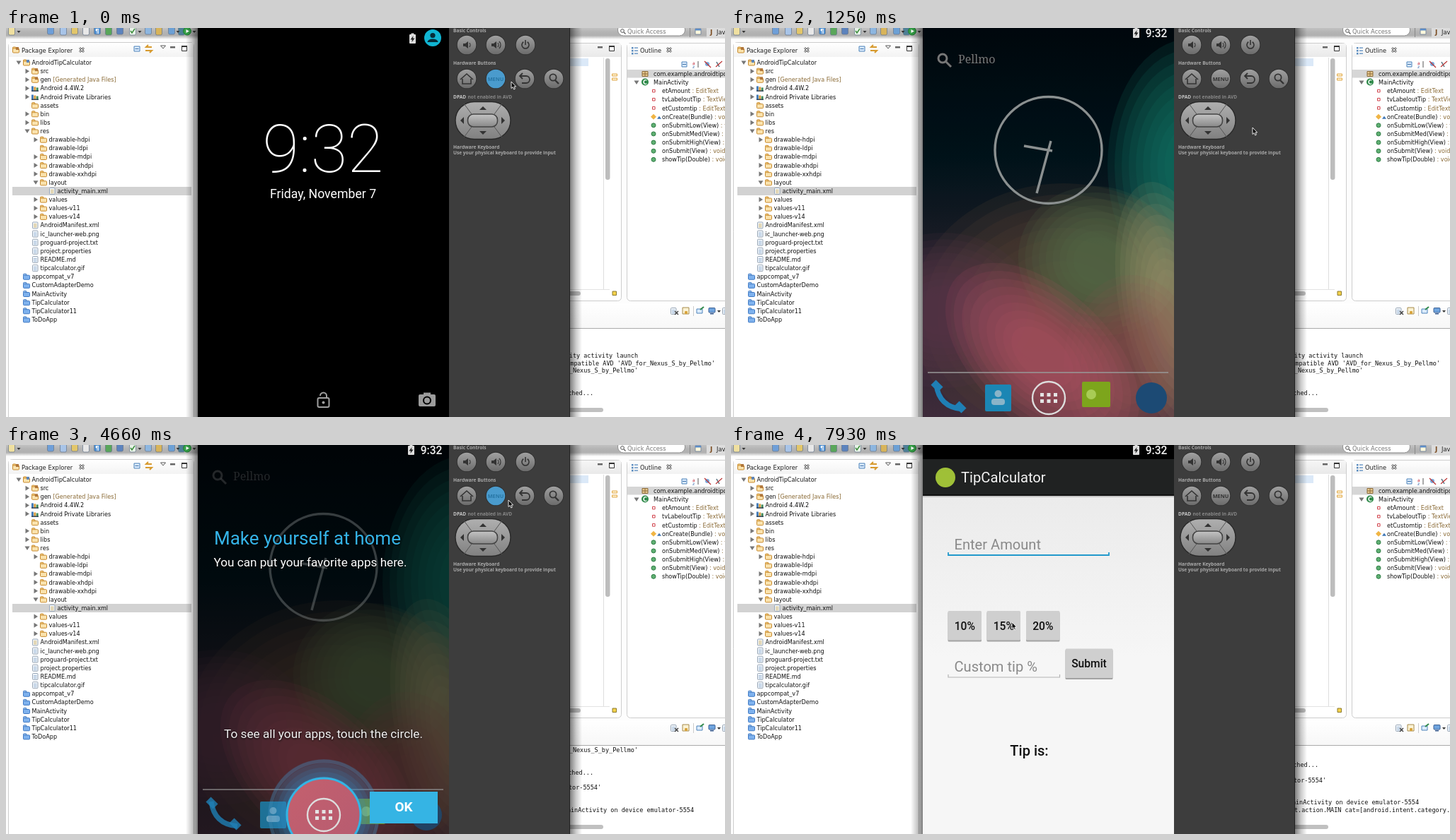
Recreate the animation shown at these times as an HTML page with a canvas. Size 1016x551 px, loop 8000 ms.

```html
<!DOCTYPE html>
<html lang="en">
<head>
<meta charset="utf-8">
<style>
html, body { margin: 0; width: 100%; height: 100%; overflow: hidden; background: #fff; }
canvas { display: block; }
</style>
</head>
<body>
<canvas id="stage" width="1016" height="551"></canvas>
<script>
const c = document.getElementById('stage').getContext('2d');
const LOOP = 8000, ROW = 12.13;
const UI = '"DejaVu Sans", sans-serif', MONO = '"DejaVu Sans Mono", monospace';
const ROBOTO = 'Roboto, sans-serif', PANEL = '"Open Sans", sans-serif';

// ---- drawing helpers ----
function rect(x, y, w, h, color) { c.fillStyle = color; c.fillRect(x, y, w, h); }
function paint(fill, stroke, width = 1) {
  if (fill) { c.fillStyle = fill; c.fill(); }
  if (stroke) { c.strokeStyle = stroke; c.lineWidth = width; c.stroke(); }
}
function round(x, y, w, h, r, fill, stroke, width) {
  c.beginPath(); c.roundRect(x, y, w, h, r); paint(fill, stroke, width);
}
function circle(x, y, r, fill, stroke, width) {
  c.beginPath(); c.arc(x, y, r, 0, 7); paint(fill, stroke, width);
}
function trace(points) {
  c.beginPath();
  for (let i = 0; i < points.length; i += 2) c.lineTo(points[i], points[i + 1]);
}
function poly(fill, ...points) { trace(points); c.closePath(); paint(fill); }
function line(color, width, ...points) { trace(points); paint(null, color, width); }
function text(s, x, y, size, color, font = UI, weight = 400, align = 'left') {
  c.font = `${weight} ${size}px ${font}`;
  c.fillStyle = color; c.textAlign = align;
  c.fillText(s, x, y);
}
function fade(x0, y0, x1, y1, ...colors) {
  const g = c.createLinearGradient(x0, y0, x1, y1);
  colors.forEach((color, i) => g.addColorStop(i / (colors.length - 1), color));
  return g;
}
// nested translucent ellipses that build up a stepped glow
function bands(x, y, rx, ry, angle, rgb, alpha) {
  for (let k = 1; k > .25; k -= .085) {
    c.beginPath(); c.ellipse(x, y, rx * k, ry * k, angle, 0, 7);
    paint(`rgba(${rgb},${alpha * .2})`);
  }
}
function clip(x, y, w, h, draw) {
  c.save(); c.beginPath(); c.rect(x, y, w, h); c.clip(); draw(); c.restore();
}
const at = (keys, t) => keys.findLast(k => k[0] <= t);

// ---- IDE ----
// level, arrow (- none, > closed, v open), icon, label
const tree = `0 v p AndroidTipCalculator
1 > s src
1 > s gen|[Generated Java Files]
1 > l Android 4.4W.2
1 > l Android Private Libraries
1 - o assets
1 > o bin
1 > o libs
1 v o res
2 > o drawable-hdpi
2 - o drawable-ldpi
2 > o drawable-mdpi
2 > o drawable-xhdpi
2 > o drawable-xxhdpi
2 v o layout
3 - x activity_main.xml
2 > o values
2 > o values-v11
2 > o values-v14
1 - x AndroidManifest.xml
1 - f ic_launcher-web.png
1 - f proguard-project.txt
1 - f project.properties
1 - f README.md
1 - f tipcalculator.gif
0 - b appcompat_v7
0 - b CustomAdapterDemo
0 - b MainActivity
0 - b TipCalculator
0 - b TipCalculator11
0 - b ToDoApp`.split('\n').map(r => [+r[0], r[2], r[4], r.slice(6)]);

const members = ['f etAmount : EditText', 'f tvLabeloutTip : TextView', 'f etCustomtip : EditText',
  'o onCreate(Bundle) : void', 'm onSubmitLow(View) : void', 'm onSubmitMed(View) : void',
  'm onSubmitHigh(View) : void', 'm onSubmit(View) : void', 'm showTip(Double) : void'];

// line number, right edge, text
const log = [
  [0, 893, 'MainActivity activity launch'],
  [1, 1002, "compatible AVD 'AVD_for_Nexus_S_by_Pellmo'"],
  [2, 893, "AVD_for_Nexus_S_by_Pellmo'"],
  [5, 830, 'launched...'],
  [7, 841, "'emulator-5554'"],
  [10, 972, 'MainActivity on device emulator-5554'],
  [11, 1016, 'android.intent.action.MAIN cat=[android.intent.category.']];
const lastLine = [[0, 5], [1970, 7], [4660, 10], [4810, 11]];

function arrow(x, y, open) {
  if (open) poly('#777', x - 3.5, y - 2.5, x + 3.5, y - 2.5, x, y + 3);
  else poly('#777', x - 2.5, y - 3.5, x + 3, y, x - 2.5, y + 3.5);
}
function icon(kind, x, y) {
  if (kind == 'l') {
    ['#3f78b5', '#d69a3a', '#3f8a5a'].forEach((color, i) => rect(x - 5 + i * 3.4, y - 3 + i, 2.8, 7 - i, color));
    rect(x - 5, y + 3, 10, 1.5, '#345');
  } else if (kind == 'f' || kind == 'x') {
    round(x - 3.5, y - 4.5, 7.5, 9, 1, '#f4f8fc', '#8d9cae', .9);
    for (let i = 0; i < 3; i++) rect(x - 2, y - 2 + i * 2, 4.5, .8, kind == 'x' ? '#c9a54d' : '#86a8cc');
  } else {
    const blue = kind == 'b', edge = blue ? '#3f78c2' : '#c88a2d';
    round(x - 4.5, y - 4, 4.5, 3, 1, blue ? '#a9cdf5' : '#f6d48c', edge);
    round(x - 4.5, y - 2, 9, 6, 1, blue ? '#7fb2ee' : '#fae3ae', edge);
    if (kind == 's' || kind == 'p') rect(x, y - 4, 4, 4, kind == 's' ? '#b0763a' : '#5f86b8');
  }
}
function windowButtons(x) {
  rect(x, 26, 7, 2.5, '#666');
  round(x + 16.5, 25.5, 7, 7, 0, '#fff', '#333');
  rect(x + 16, 25, 8, 2, '#333');
}
function closeMark(x) {
  line('#555', 2.6, x - 3, 28, x + 3, 34); line('#555', 2.6, x + 3, 28, x - 3, 34);
  line('#fff', 1, x - 3, 28, x + 3, 34); line('#fff', 1, x + 3, 28, x - 3, 34);
}
function panel(x, y, w, h) { round(x + .5, y + .5, w, h, 5, '#fff', '#cdcdcd'); }

function ide(t) {
  rect(0, 0, 1016, 551, '#fdfdfd');
  rect(0, 0, 1016, 16, fade(0, 0, 0, 16, '#c2c2c2', '#b4b4b4', '#b0b0b0', '#fdfdfd'));
  const colors = ['#f0e0a0', '#6f9fd8', '#a8c4e8', '#e3c66a', '#e8e8e8', '#4f8fd0', '#59a65a', '#5c83bd', '#e8f2e8', '#8db6e0', '#d8b45a', '#6ca0d5', '#4e7f96'];
  [8, 63, 81, 97, 113, 129, 145, 161, 179, 201, 216, 234, 248].forEach((x, i) =>
    round(x - 4.5, -2, 9, i % 2 ? 11 : 12, 2, colors[i], '#65748a', .7));
  text('¶', 126, 8, 9, '#fff', UI, 700);
  line('#3a8c3a', 1.5, 176, 4, 178, 7, 182, 1);
  [18, 189, 243, 266].forEach(x => poly('#333', x - 2.5, 4, x + 2.5, 4, x, 7));
  circle(256, 4.5, 5.5, '#35a047', '#1f7a30');
  poly('#fff', 254.5, 2, 259, 4.5, 254.5, 7);

  panel(3, 20, 262, 540);
  rect(4, 21, 261, 20, fade(0, 21, 0, 41, '#fff', '#f3f3f3'));
  icon('s', 14, 31);
  text('Package Explorer', 22, 34.5, 8.4, '#222');
  closeMark(107);
  round(181, 26, 8, 7, 0, '#dcecff', '#4c82b8'); rect(182.5, 29, 5, 1, '#3b6ea5');
  line('#d79a2e', 2, 206, 27, 198, 27, 201, 24); line('#d79a2e', 2, 197, 32, 206, 32, 203, 35);
  poly('#fff', 218.5, 25, 225.5, 25, 222, 29); line('#444', .9, 218.5, 25, 225.5, 25, 222, 29, 218.5, 25);
  windowButtons(232);
  rect(9, 225, 253, 12, '#d2d2d2');
  tree.forEach(([level, mark, kind, label], i) => {
    const y = 49 + i * ROW, x = 36.5 + level * 12, [name, note] = label.split('|');
    if (mark != '-') arrow(x - 18.5, y, mark == 'v');
    icon(kind, x - 7.5, y);
    text(name, x, y + 3, 8.1, '#111');
    if (note) text(note, x + c.measureText(name + ' ').width, y + 3, 8.1, '#8a6a35');
  });

  // editor
  panel(780, 21, 89, 365);
  rect(797, 22, 72, 19, fade(0, 22, 0, 41, '#f6f6f6', '#e9e9e9'));
  rect(797, 43, 26, 11, '#dbe9f8');
  windowButtons(836);
  rect(844, 42, 1, 328, '#dedede');
  round(847, 43, 6.5, 172, 3, '#bdbdbd');
  rect(797, 370, 56, 1, '#e2e2e2');
  round(780, 373, 32, 6, 3, '#bdbdbd');
  [65, 71].forEach(y => round(856.5, y, 7, 3, 0, '#fff0cc', '#e0a94c'));
  round(857, 373, 5.5, 5.5, 0, '#f5d24a', '#8a7a30');

  // top right
  round(864.5, -6, 95, 17, 8, '#fff', '#8f8f8f');
  circle(871, 4, 2.4, null, '#555'); line('#555', 1.2, 873, 6, 875.5, 8.5);
  text('Quick Access', 878, 8, 8.3, '#777');
  rect(966, 0, 1, 13, '#888');
  round(974, 1, 8, 8, 0, '#fff8dc', '#7a8aa0'); rect(974, 1, 8, 2.5, '#5b8cc8');
  rect(990, 0, 26, 13, '#dcdcdc');
  text('J', 995, 9, 9, '#7a4b20', UI, 700); text('Java', 1004, 9, 8.3, '#222');

  // outline
  panel(877, 21, 150, 365);
  rect(878, 22, 138, 19, fade(0, 22, 0, 41, '#fff', '#f2f2f2'));
  [0, 4, 8].forEach(d => { rect(884, 27 + d, 2.5, 2.5, '#5a8cc0'); rect(888, 27.5 + d, 5, 1.3, '#5a8cc0'); });
  text('Outline', 896, 34.5, 8.3, '#222');
  closeMark(937);
  round(955, 48, 7, 7, 0, '#dcecff', '#4c82b8'); rect(956, 51, 5, 1, '#3b6ea5');
  text('a', 970, 52, 6, '#b23'); text('z', 970, 57, 6, '#36a'); line('#555', 1, 978, 47, 978, 56);
  circle(991, 51, 3, '#78a9dc'); line('#b33', 1.2, 987, 47, 996, 56);
  line('#467', 1.4, 1004, 48, 1008, 55); line('#b33', 1.2, 1003, 55, 1012, 47);
  rect(878, 59, 138, 11.5, '#d6d6d6');
  round(899, 61.5, 8, 7, 0, '#e6c890', '#8b6a38'); line('#8b6a38', 1, 903, 61, 903, 69); line('#8b6a38', 1, 899, 65, 907, 65);
  text('com.example.androidtipcalculator', 915, 68, 8.1, '#111');
  arrow(891, 77, true);
  circle(903, 76.5, 5, '#2f8a4a'); text('C', 903, 79.5, 8, '#fff', UI, 700, 'center');
  text('MainActivity', 915, 80, 8.1, '#111');
  members.forEach((m, i) => {
    const y = 89.3 + i * ROW, [name, type] = m.slice(2).split(' : ');
    if (m[0] == 'f') round(913.5, y - 2, 3.6, 3.6, 0, '#fff', '#d0404a');
    else if (m[0] == 'm') circle(915, y, 3, '#5faf72', '#2f7d45');
    else { poly('#f0b545', 911, y, 915, y - 4, 919, y, 915, y + 4); poly('#3c74b4', 920, y + 3, 926, y + 3, 923, y - 1); }
    text(name, 927, y + 3, 8.1, '#111');
    text(' : ' + type, 927 + c.measureText(name).width, y + 3, 8.1, '#8a6a35');
  });

  // console
  rect(797, 390, 219, 36, fade(0, 390, 0, 426, '#fff', '#f7f7f7'));
  rect(797, 425, 219, 1, '#aaa');
  rect(797, 426, 219, 125, '#fff');
  icon('f', 943, 401); line('#444', 1.4, 945, 401, 950, 406); line('#444', 1.4, 950, 401, 945, 406);
  round(956, 396, 9, 9, 0, '#fbf3d5', '#a68a4a'); round(959, 401, 4, 4, 1, '#d9a43c');
  rect(971, 394, 1, 14, '#ccc');
  round(976, 398, 8, 6, 0, '#dcecff', '#4c82b8'); line('#2f8a4a', 2, 981, 399, 986, 395);
  round(993, 396.5, 9, 6.5, 1, '#6fa4de', '#3b5f92'); rect(995, 404, 5, 1.5, '#3b5f92');
  poly('#333', 1005, 400, 1010, 400, 1007.5, 403);
  icon('f', 1016, 401);
  const last = at(lastLine, t)[1];
  clip(780, 427, 236, 110, () => log.forEach(([n, x, s]) => {
    if (n <= last) text(s, x, 520 + (n - last) * 10.6, 8.5, '#111', MONO, 400, 'right');
  }));
  round(780, 538, 64, 6, 3, '#c0c0c0');
}

// ---- emulator side panel ----
function key(x, y, blue) {
  circle(x, y, 14.2, '#2d2d2d');
  circle(x, y, 13.3, blue ? '#4a9bcd' : fade(0, y - 13, 0, y + 13, '#a0a0a0', '#6c6c6c'));
}
function speaker(x, y, waves) {
  poly('#333', x - 5, y - 2, x - 2, y - 2, x + 2, y - 5, x + 2, y + 5, x - 2, y + 2, x - 5, y + 2);
  for (let i = 0; i < waves; i++) { c.beginPath(); c.arc(x + 1, y, 4 + i * 3, -.8, .8); paint(null, '#333', 1.2); }
}
function sidePanel(blue) {
  rect(626, 0, 171, 551, '#3d3d3d');
  rect(796, 0, 1, 551, '#222');
  const label = (s, x, y, color = '#a9a9a9') => text(s, x, y, 6.6, color, PANEL, 700);
  label('Basic Controls', 632, 6);
  label('Hardware Buttons', 632, 52);
  label('DPAD', 632, 100, '#c8c8c8'); label('not enabled in AVD', 652.5, 100, '#888');
  label('Hardware Keyboard', 632, 171);
  label('Use your physical keyboard to provide input', 632, 179);
  [651, 692, 734].forEach(x => key(x, 24));
  speaker(651, 24, 1); speaker(691, 24, 2);
  c.beginPath(); c.arc(734, 24, 5, -1, 4.14); paint(null, '#333', 1.6); line('#333', 1.6, 734, 17, 734, 24);
  [651, 692, 733, 774].forEach(x => key(x, 72, blue && x == 692));
  line('#333', 1.6, 642, 73, 651, 65, 660, 73); line('#333', 1.6, 645, 72, 645, 79, 657, 79, 657, 72);
  text('MENU', 692, 75, 7.4, blue ? '#2876a5' : '#333', PANEL, 700, 'center');
  line('#333', 1.8, 730, 64, 726, 68, 730, 72);
  c.beginPath(); c.moveTo(726, 68); c.lineTo(735, 68); c.arc(735, 73, 5, -1.57, 1.57); c.lineTo(729, 78); paint(null, '#333', 1.8);
  circle(773, 70, 4.6, null, '#333', 1.8); line('#333', 2.4, 776, 74, 781, 79);
  round(635, 104.5, 78, 53, 30, fade(0, 104, 0, 158, '#b0b0b0', '#808080'), '#292929', 1.4);
  [[647, 107, 658, 122], [701, 107, 690, 122], [647, 155, 658, 140], [701, 155, 690, 140]].forEach(p => line('#555', 1, ...p));
  round(652.5, 122, 42, 18, 8, fade(0, 122, 0, 140, '#c4c4c4', '#888'), '#444', 1.6);
  poly('#333', 669, 116, 679, 116, 674, 111); poly('#333', 669, 146, 679, 146, 674, 151);
  poly('#333', 647, 126, 647, 136, 642, 131); poly('#333', 700, 126, 700, 136, 705, 131);
}

// ---- phone screens ----
function wallpaper(shade) {
  rect(271, 0, 355, 551, fade(0, 0, 0, 551, '#00080e', '#00141c', '#2a2430', '#453040'));
  bands(650, 195, 118, 180, 0, '20,130,112', .8);
  bands(470, 405, 215, 185, 0, '100,76,56', .8);
  bands(300, 400, 130, 110, 0, '96,60,84', .6);
  bands(520, 330, 115, 105, .3, '92,120,78', .7);
  bands(625, 400, 75, 185, -.2, '180,170,122', .6);
  bands(565, 480, 95, 130, 0, '160,92,86', .5);
  bands(440, 465, 165, 95, .75, '204,90,114', .6);
  rect(271, 0, 355, 551, `rgba(0,0,0,${shade})`);
}
function battery(x, y) {
  round(x - 4.5, y - 6, 9, 13, 1, '#ddd'); rect(x - 2, y - 7.5, 4, 2, '#ddd');
  poly('#222', x + 1, y - 4, x - 3, y + 1.5, x - .5, y + 1.5, x - 1, y + 5, x + 3, y - .5, x + .5, y - .5);
}
function statusBar() {
  battery(572.5, 7);
  text('9:32', 601, 13, 15.6, '#f2f2f2', ROBOTO, 500, 'center');
}
function lockScreen() {
  rect(271, 0, 355, 551, '#000');
  battery(574.5, 15);
  circle(603, 14, 12, '#10b5d2');
  circle(603, 10.5, 3.6, '#062c38');
  c.beginPath(); c.ellipse(603, 20, 7.5, 4.5, 0, Math.PI, 0); paint('#062c38');
  text('9:32', 448, 204, 94, '#fff', ROBOTO, 100, 'center');
  text('Friday, November 7', 448, 241, 17.7, '#fff', ROBOTO, 400, 'center');
  round(440.5, 524, 16, 13, 2, null, '#a0a0a0', 2); circle(448.5, 530.5, 2, '#a0a0a0');
  c.beginPath(); c.arc(448.5, 521, 4.5, Math.PI, 0); c.lineTo(453, 524); paint(null, '#a0a0a0', 2);
  round(583, 519, 24, 17, 2, '#9c9c9c'); rect(590, 516.5, 10, 4, '#9c9c9c');
  circle(595, 527.5, 5, '#9c9c9c', '#000', 2);
}
function home(cling) {
  wallpaper(.1 + .4 * cling);
  c.globalAlpha = 1 - .7 * cling;
  circle(299, 43, 6, null, '#777', 3); line('#777', 3, 303.5, 47.5, 311, 55);
  text('Pellmo', 321, 50, 16, '#777', '"Noto Serif", serif');
  c.globalAlpha = 1 - .6 * cling;
  circle(448.5, 173, 75.5, null, '#8b9090', 3.4);
  line('#8b9090', 3.4, 452, 160, 432, 234); line('#8b9090', 3.4, 454, 174, 414, 167);
  c.globalAlpha = 1 - .2 * cling;
  line('#999', 1.4, 278, 488, 618, 488);
  c.beginPath(); c.moveTo(290, 505); c.quadraticCurveTo(294, 537, 327, 540); paint(null, '#1f7fb5', 7);
  line('#1f7fb5', 10, 286, 502, 296, 512); line('#1f7fb5', 10, 319, 532, 329, 542);
  round(359, 505, 37, 38, 2, '#1b86b4');
  circle(377.5, 518, 5, '#8ab4c8'); round(368, 525, 19, 9, 4, '#8ab4c8');
  round(496, 501, 40, 36, 2, '#7da51c'); circle(509, 519, 7, '#a8cc55');
  circle(594, 524, 22, '#1c4a74');
  c.globalAlpha = 1;
  statusBar();
  if (cling) {
    c.globalAlpha = cling;
    for (let r = 79; r > 54; r -= 6) circle(449, 524, r, 'rgba(51,140,200,.15)');
    circle(449, 524, 76, null, 'rgba(70,140,185,.3)', 5);
    circle(449, 524, 52, fade(400, 475, 490, 551, '#c4606e', '#b85c70'), '#33b5e5', 3);
  }
  circle(449, 524, 23, null, '#ddd', 2.4);
  for (let i = 0; i < 6; i++) rect(437 + i % 3 * 9.5, 517 + (i > 2) * 9, 5, 5, '#e4e4e4');
  if (cling) {
    c.shadowColor = '#000'; c.shadowBlur = 3; c.shadowOffsetY = 1;
    text('Make yourself at home', 294, 141, 26, '#35b4e8', ROBOTO);
    text('You can put your favorite apps here.', 293.5, 172, 17.15, '#fff', ROBOTO);
    text('To see all your apps, touch the circle.', 448.5, 414.5, 17.2, '#f2f2f2', ROBOTO, 400, 'center');
    c.shadowColor = 'transparent';
    rect(514, 491, 96, 45, '#35b4e4');
    text('OK', 562, 519, 19, '#fff', ROBOTO, 700, 'center');
  }
  c.globalAlpha = 1;
}
function field(hint, x, y, w, color, width) {
  text(hint, 315.5, y - 8, 20.1, '#8a8a8a', ROBOTO);
  line(color, width, x, y - 4, x, y, x + w, y, x + w, y - 4);
}
function button(label, x, y, w) {
  round(x, y + 1.5, w, 42, 1.5, '#a3a3a3');
  round(x, y, w, 41.5, 1.5, '#cfcfcf');
  text(label, x + w / 2, y + 26.5, 15.6, '#111', ROBOTO, 500, 'center');
}
function app(dy, caret) {
  c.save();
  c.translate(0, dy);
  rect(271, 20, 355, 540, fade(0, 72, 0, 300, '#ebebeb', '#f6f6f6'));
  rect(271, 20, 355, 51, '#202222');
  rect(271, 70, 355, 2, '#111'); rect(271, 72, 355, 2, '#c5c5c5');
  circle(303, 46, 14, '#9fc037');
  text('TipCalculator', 325, 53, 20.2, '#f3f3f3', ROBOTO);
  field('Enter Amount', 307, 156, 227, '#2299cc', 1.8);
  if (caret) rect(315.5, 126, 1.3, 27, '#333');
  button('10%', 306.5, 235, 47.5); button('15%', 361.5, 235, 47.5); button('20%', 417, 235, 47.5);
  field('Custom tip %', 307, 329, 157.5, '#b4b4b4', 1.2);
  button('Submit', 472.5, 288.5, 67);
  text('Tip is:', 421.5, 440, 20, '#111', ROBOTO, 500, 'center');
  c.restore();
}

// ---- timeline ----
const pointer = [[0, 714, 76], [900, 722, 100], [1100, 734, 136], [1250, 737, 141],
  [1970, 730, 118], [2120, 716, 92], [2260, 711, 80], [2410, 710, 78],
  [5400, 690, 98], [5550, 650, 134], [5700, 606, 170], [5850, 573, 192], [6000, 536, 209],
  [6140, 508, 219], [6290, 498, 221], [7630, 493, 219], [7780, 408, 243], [7930, 397, 251]];
const menuBlue = [[0, true], [1250, false], [2120, true], [6000, false]];
const slide = [[5250, 94], [5400, 26], [5550, 4], [5700, 0]];
const caretOn = [[5250, true], [5700, false], [6140, true], [6590, false], [7040, true], [7630, false]];

function phone(t) {
  if (t < 900) lockScreen();
  else if (t < 1250) { wallpaper(t < 1100 ? .8 : .5); rect(271, 0, 355, 20, '#000'); }
  else if (t < 1430) home(0);
  else if (t < 1610) home(.6);
  else if (t < 5250) home(1);
  else {
    home(1);
    rect(271, 0, 355, 20, '#000'); rect(271, 20, 355, 531, 'rgba(0,0,0,.3)');
    statusBar();
    app(at(slide, t)[1], at(caretOn, t)[1]);
  }
}
function cursor(x, y) {
  trace([x, y, x, y + 9.5, x + 2.2, y + 7.5, x + 3.8, y + 11, x + 5.4, y + 10.2, x + 3.9, y + 7, x + 6.6, y + 7]);
  c.closePath(); paint('#000', '#fff', .9);
}
function draw(t) {
  ide(t);
  rect(797, 0, 17, 551, fade(797, 0, 814, 0, 'rgba(0,0,0,.5)', 'rgba(0,0,0,.2)', 'rgba(0,0,0,0)'));
  rect(254, 0, 17, 551, fade(254, 0, 271, 0, 'rgba(0,0,0,0)', 'rgba(0,0,0,.2)', 'rgba(0,0,0,.5)'));
  clip(271, 0, 355, 551, () => phone(t));
  sidePanel(at(menuBlue, t)[1]);
  const [, x, y] = at(pointer, t);
  cursor(x, y);
}
let start;
function tick(now) {
  start ??= now;
  draw((now - start) % LOOP);
  requestAnimationFrame(tick);
}
requestAnimationFrame(tick);
</script>
</body>
</html>
```
